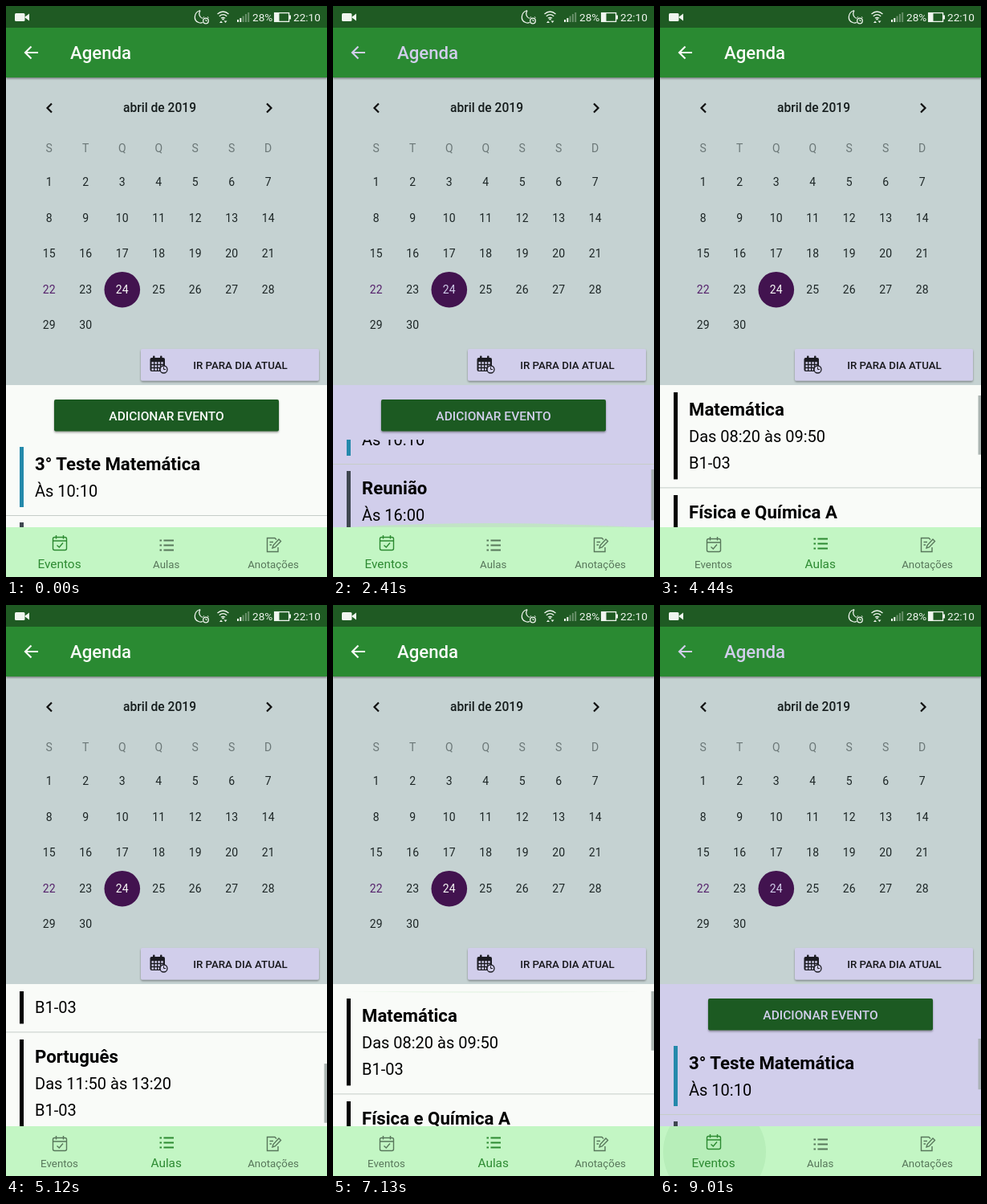
An HTML page that plays this animation: 400 by 711 pixels, repeating every 9100 ms.

```html
<!DOCTYPE html>
<html lang="pt">
<head>
<meta charset="utf-8">
<title>Agenda</title>
<style>
  html, body { margin: 0; width: 100%; height: 100%; overflow: hidden; background: #c5d2d2; }
  svg { display: block; width: 100%; height: 100%; color: #f9fbf8; }
  text { font-family: Roboto, Arial, sans-serif; }
  .mid { text-anchor: middle; }
  .med { font-weight: 500; }
  .day { font-size: 14px; fill: #1d2626; }
  .name { font-size: 22.2px; font-weight: 700; }
  .info { font-size: 20px; }
  .line { fill: none; stroke: currentColor; stroke-width: 1.4; }
  .tab { color: #58775b; font-size: 13.3px; }
  .tab.on { color: #2c8a31; font-size: 15.4px; }
  .tab.on .icon { transform: translateY(-2px); }
  .tab text { fill: currentColor; }
</style>
</head>
<body>
<svg id="stage" viewBox="0 0 400 711" preserveAspectRatio="none">
  <defs>
    <clipPath id="eventsClip"><rect y="540" width="400" height="109"/></clipPath>
    <clipPath id="classesClip"><rect y="481" width="400" height="168"/></clipPath>
    <clipPath id="navClip"><rect y="649" width="400" height="62"/></clipPath>
    <filter id="shadow" x="-5%" y="-20%" width="110%" height="150%">
      <feDropShadow dx="0" dy="1.5" stdDeviation="1.2" flood-opacity=".4"/>
    </filter>
  </defs>

  <rect width="400" height="711" fill="#c5d2d2"/>
  <g filter="url(#shadow)"><rect y="27" width="400" height="62" fill="#2c8a31"/></g>
  <rect width="400" height="27" fill="#1f5a23"/>

  <!-- status bar -->
  <g fill="#f0f5ef">
    <rect x="11" y="9" width="12.5" height="10" rx="1.5"/>
    <path d="M23 14L29 9.5V18.5Z"/>
    <g fill="none" stroke="#f0f5ef" stroke-width="1.3">
      <path d="M242 5.5C234 8 233 18 240 20.5C242 21.3 244 21 245 20.5M242 5.5C239.5 10 241 14 245 15.5"/>
      <circle cx="249" cy="18.5" r="3.3"/>
      <path d="M249 16.5V18.5H250.5M245.5 14.5L247 13.5M252.5 14.5L251 13.5" stroke-width="1"/>
      <path d="M263.5 10Q270.5 4 277.5 10M265.8 12.7Q270.5 8.7 275.2 12.7M268 15.3Q270.5 13.3 273 15.3"/>
      <rect x="334.6" y="8.6" width="18" height="10.8"/>
    </g>
    <path d="M270.5 15L272.3 17.3H268.7ZM266 21L268 18.5L270 21ZM271.5 18.5H275.5L273.5 21Z"/>
    <rect x="335" y="9" width="5.5" height="10"/>
    <rect x="353" y="11.5" width="2" height="5"/>
    <path d="M288 20V17h2v3zM291.3 20V15h2v5z"/>
    <path d="M294.6 20V12.5h2V20zM297.9 20V10h2V20zM301.2 20V8h2V20z" opacity=".35"/>
    <text x="307" y="18.5" font-size="13.6">28%</text>
    <text x="358" y="18.5" font-size="13.6">22:10</text>
  </g>

  <path d="M40 58H24M31.5 50.5L24 58L31.5 65.5" fill="none" stroke="currentColor" stroke-width="2.2"/>
  <text x="80" y="66" font-size="22.2" class="med" fill="currentColor">Agenda</text>

  <!-- calendar -->
  <path d="M57 121.5L51.5 127L57 132.5M325 121.5L330.5 127L325 132.5" fill="none" stroke="#111" stroke-width="2.2"/>
  <text x="191.5" y="132" font-size="15.6" class="mid med" fill="#151c1c">abril de 2019</text>
  <circle cx="144.8" cy="353.2" r="22.3" fill="#42134f"/>
  <g id="days"></g>

  <g filter="url(#shadow)"><rect x="168" y="427" width="222" height="39.5" rx="2" fill="#d1ceeb"/></g>
  <g fill="#1c1c22">
    <rect x="179.5" y="438" width="18.5" height="17" rx="2"/>
    <rect x="183" y="435.5" width="2.5" height="5" rx="1"/>
    <rect x="192" y="435.5" width="2.5" height="5" rx="1"/>
    <path d="M181.5 444.5H196.5M181.5 448.5H196.5M181.5 452.5H191" stroke="#d1ceeb" stroke-width="2.3" stroke-dasharray="2.6 1.3"/>
    <circle cx="196.5" cy="452.5" r="4.5" fill="#d1ceeb" stroke="#1c1c22" stroke-width="1.3"/>
    <path d="M196.5 449.5V452.5H199" fill="none" stroke="#1c1c22"/>
  </g>
  <text x="292" y="452" font-size="13.3" class="mid med" fill="#18181c">IR PARA DIA ATUAL</text>

  <!-- lists -->
  <rect y="472" width="400" height="177" fill="currentColor"/>
  <g id="events">
    <g filter="url(#shadow)"><rect x="60" y="490" width="280" height="39.5" rx="2" fill="#1f5a23"/></g>
    <text x="200" y="516" font-size="15.5" class="mid med" fill="currentColor">ADICIONAR EVENTO</text>
    <g clip-path="url(#eventsClip)"><g id="eventItems"></g></g>
  </g>
  <g id="classes" clip-path="url(#classesClip)"><g id="classItems"></g></g>
  <path id="glow" fill="#bfe8bf"/>
  <rect id="bar" x="396.5" width="3.5" fill="#9faaa6"/>

  <!-- bottom tabs -->
  <rect y="649" width="400" height="62" fill="#c3f6c4"/>
  <circle id="ripple" cy="681" fill="#2c8a31" clip-path="url(#navClip)"/>
  <g class="tab" id="tabEvents">
    <g class="icon line">
      <rect x="58.5" y="663.5" width="17" height="16" rx="2"/>
      <path d="M58.5 668H75.5M62.5 661V665.5M71.5 661V665.5M63.5 673.5L66.3 676L71 670.5"/>
    </g>
    <text x="66.5" y="700" class="mid">Eventos</text>
  </g>
  <g class="tab" id="tabClasses">
    <path class="icon" d="M191.5 665.5H194M196.5 665.5H209M191.5 671.5H194M196.5 671.5H209M191.5 677.5H194M196.5 677.5H209" stroke="currentColor" stroke-width="2.2"/>
    <text x="199.7" y="700" class="mid">Aulas</text>
  </g>
  <g class="tab">
    <g class="icon line">
      <path d="M339 674V679.5H325.5V662.5H335L337 664.5M328.5 667.5H333M328.5 671H331"/>
      <path d="M332 675L333 671.5L340 664L342.5 666.5L335.3 674Z"/>
    </g>
    <text x="333" y="700" class="mid">Anotações</text>
  </g>
</svg>

<script>
const LOOP = 9100, BOTTOM = 649;
const TAP_CLASSES = 3580, TAP_EVENTS = 8640, TAP_DELAY = 100;
const TO_CLASSES = TAP_CLASSES + TAP_DELAY, TO_EVENTS = TAP_EVENTS + TAP_DELAY;
const LILAC_FROM = 90;
const el = id => document.getElementById(id);
const set = (id, attrs) => {
  for (const key in attrs) el(id).setAttribute(key, attrs[key]);
};

// Linear interpolation through [time, value] points
function track(t, points) {
  let [t0, v0] = points[0];
  if (t <= t0) return v0;
  for (const [t1, v1] of points) {
    if (t < t1) return v0 + (v1 - v0) * (t - t0) / (t1 - t0);
    [t0, v0] = [t1, v1];
  }
  return v0;
}

function buildCalendar() {
  const cell = (col, y, label, fill) =>
    `<text class="day mid" x="${53.7 + 45.5 * col}" y="${y}" style="fill:${fill}">${label}</text>`;
  let out = [..."STQQSSD"].map((d, i) => cell(i, 182, d, "#6b7777")).join("");
  for (let d = 1; d <= 30; d++) {
    const fill = d === 24 ? "currentColor" : d === 22 ? "#54206a" : "#1d2626";
    out += cell((d - 1) % 7, 224.3 + 44.5 * Math.floor((d - 1) / 7), d, fill);
  }
  el("days").innerHTML = out;
}

function buildList(id, top, height, items) {
  el(id).innerHTML = items.map(([color, name, ...info], i) => {
    const y = Math.round(top + 9 + i * (height + 19.4));
    const divider = i < items.length - 1
      ? `<rect y="${y + height + 10}" width="400" height="1" fill="#c6cdc8"/>` : "";
    return `<rect x="17" y="${y}" width="5" height="${height}" fill="${color}"/>` +
      `<text class="name" x="36" y="${y + 29}">${name}</text>` +
      info.map((s, k) => `<text class="info" x="36" y="${y + 62 + 33 * k}">${s}</text>`).join("") +
      divider;
  }).join("");
}

buildCalendar();
buildList("eventItems", 540, 75, [
  ["#2489ab", "3° Teste Matemática", "Às 10:10"],
  ["#3f4650", "Reunião", "Às 16:00"]
]);
buildList("classItems", 481, 108.4, [
  ["#000", "Matemática", "Das 08:20 às 09:50", "B1-03"],
  ["#000", "Física e Química A", "Das 10:10 às 11:40", "B1-03"],
  ["#000", "Português", "Das 11:50 às 13:20", "B1-03"]
]);

// Each list is dragged to its end, held there, and dragged back
const eventScroll = [[1050, 0], [1510, 73], [1610, 73], [1680, 79],
  [2310, 79], [2400, 64], [2500, 64], [2830, 0]];
const classScroll = [[4350, 0], [4435, 9], [4530, 9], [5150, 215],
  [5580, 215], [5900, 122], [6000, 122], [6500, 0]];
const barAlpha = [[1050, 0], [1140, .85], [3110, .85], [3360, 0], [TO_CLASSES - 1, 0],
  [TO_CLASSES, .85], [7800, .85], [8060, 0], [TO_EVENTS - 1, 0], [TO_EVENTS, .75]];
const bottomGlow = [[1680, 0], [1950, 12], [2250, 12], [2410, 5], [2500, 4], [2600, 0],
  [5150, 0], [5350, 10], [5580, 10], [5800, 0]];
const topGlow = [[6500, 0], [6700, 7], [6950, 7], [7130, 2], [7400, 0]];

function drawRipple(t) {
  const late = t >= TAP_EVENTS, age = t - (late ? TAP_EVENTS : TAP_CLASSES);
  set("ripple", {
    cx: late ? 68 : 200,
    r: track(age, [[0, 0], [60, 20], [350, 64]]),
    opacity: track(age, [[0, 0], [80, .1], [370, .08], [480, .06], [600, 0]])
  });
}

function draw(t) {
  const classesOn = t >= TO_CLASSES && t < TO_EVENTS;
  const lilac = !classesOn && t >= LILAC_FROM;
  el("stage").style.color = lilac ? "#d1ceeb" : "#f9fbf8";
  el("events").style.display = classesOn ? "none" : "";
  el("classes").style.display = classesOn ? "" : "none";
  el("tabEvents").classList.toggle("on", !classesOn);
  el("tabClasses").classList.toggle("on", classesOn);

  const scroll = track(t, classesOn ? classScroll : eventScroll);
  set(classesOn ? "classItems" : "eventItems", { transform: `translate(0 ${-Math.round(scroll)})` });

  const top = classesOn ? 481 : 540, view = BOTTOM - top;
  const content = classesOn ? 383 : 188;
  set("bar", {
    y: top + scroll * view / content,
    height: view * view / content,
    opacity: track(t, barAlpha)
  });

  const up = track(t, bottomGlow), down = track(t, topGlow);
  const edge = down ? top : BOTTOM;
  set("glow", {
    d: `M20 ${edge}Q200 ${edge + 2 * (down - up)} 380 ${edge}Z`,
    opacity: down ? .25 : .85
  });
  drawRipple(t);
}

const start = performance.now();
function tick() {
  draw((performance.now() - start) % LOOP);
  requestAnimationFrame(tick);
}
tick();
</script>
</body>
</html>
```
